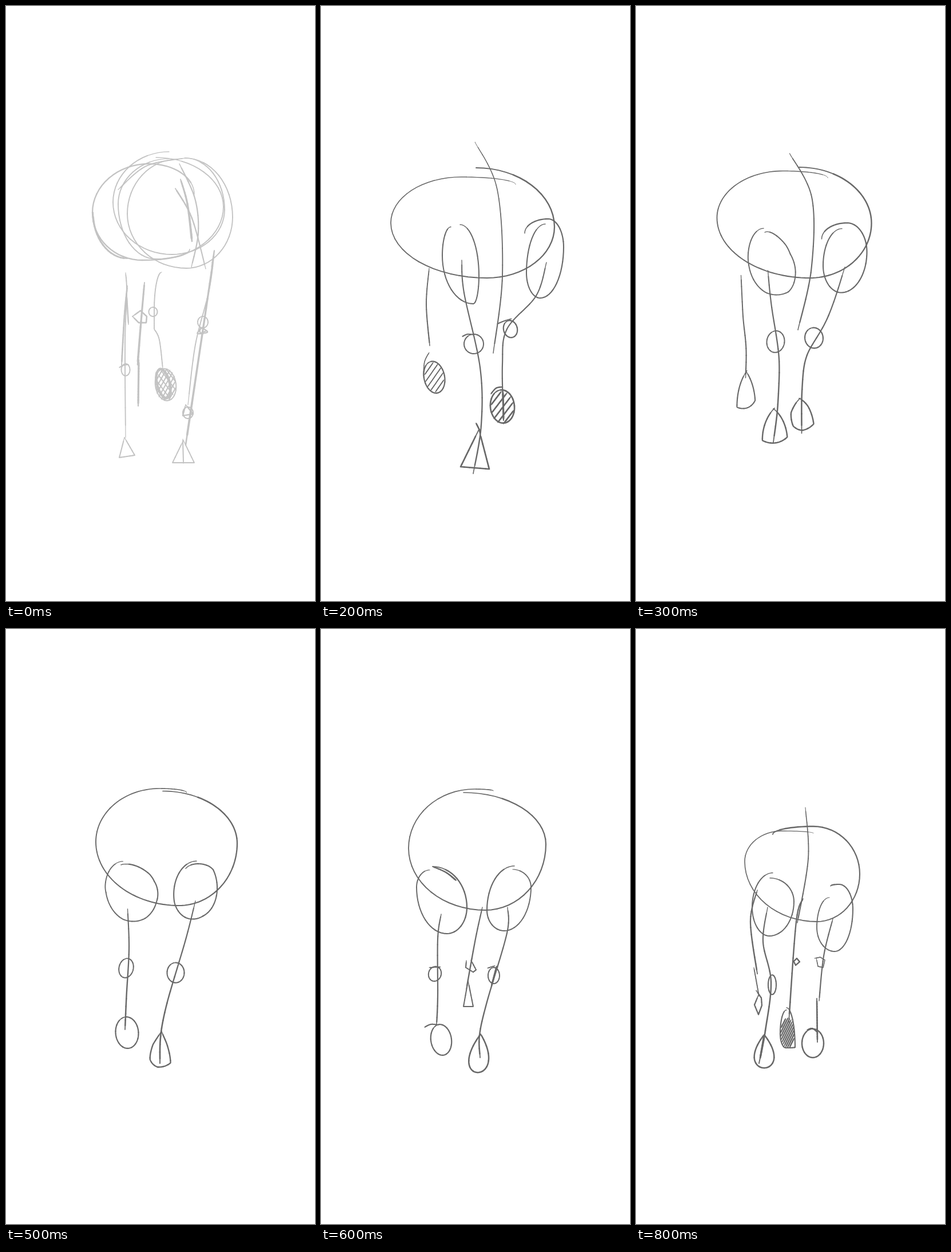
An HTML page with a canvas that plays this animation: 540 px wide and 1037 px high, repeating every 900 ms.

```html
<!DOCTYPE html>
<html lang="en">
<head>
<meta charset="utf-8">
<title>Walk cycle sketch</title>
<style>
html, body { margin: 0; width: 100%; height: 100%; overflow: hidden; background: #fff; }
canvas { display: block; width: 100vw; height: 100vh; }
</style>
</head>
<body>
<canvas id="stage" width="540" height="1037"></canvas>
<script>
const ctx = document.getElementById('stage').getContext('2d');
const STEP = 100;
const PRESSURE = 1.1;
const GREY = '#686868';
const mix = (a, b, t) => a + (b - a) * t;

// A stroke is { w0, w1, n, at(t) }: pen width at both ends, sample count and path.
const stroke = (w0, w1, n, at) => ({ w0, w1, n, at });

const pairs = xy => Array.from({ length: xy.length / 2 }, (_, i) => [xy[2 * i], xy[2 * i + 1]]);

// Walks a path made of equal parts; part(i, u) gives the point at u in part i.
function chain(w0, w1, count, part) {
  return stroke(w0, w1, count * 16, t => {
    const i = Math.min(count - 1, Math.floor(t * count));
    return part(i, t * count - i);
  });
}

function curve(w0, w1, ...xy) {
  const p = pairs(xy), last = p.length - 1;
  const spline = (a, b, c, d, t) =>
    b + t / 2 * (c - a + t * (2 * a - 5 * b + 4 * c - d + t * (3 * (b - c) + d - a)));
  return chain(w0, w1, last, (i, u) => [0, 1].map(k =>
    spline(p[Math.max(0, i - 1)][k], p[i][k], p[i + 1][k], p[Math.min(last, i + 2)][k], u)));
}

function lines(w, ...xy) {
  const p = pairs(xy);
  return chain(w, w, p.length - 1, (i, u) => [0, 1].map(k => mix(p[i][k], p[i + 1][k], u)));
}

// Egg outline: quarter ellipses between extreme points, whose tangents alternate
// between horizontal ('h') and vertical ('v').
function loop(w0, w1, first, ...xy) {
  const p = pairs(xy);
  return chain(w0, w1, p.length - 1, (i, u) => {
    const [a, b] = [p[i], p[i + 1]];
    const s = Math.sin(u * Math.PI / 2), c = 1 - Math.cos(u * Math.PI / 2);
    const flat = (i % 2 === 0) === (first === 'h');
    return [mix(a[0], b[0], flat ? s : c), mix(a[1], b[1], flat ? c : s)];
  });
}

function ring(w, cx, cy, rx, ry, tilt = 0, start = -2, sweep = 6.5) {
  const c = Math.cos(tilt), s = Math.sin(tilt);
  return stroke(w, w, 64, t => {
    const a = start + sweep * t, x = rx * Math.cos(a), y = ry * Math.sin(a);
    return [cx + x * c - y * s, cy + x * s + y * c];
  });
}

// Teardrop hanging from its tip; lean shifts the bottom sideways.
function drop(w, x, top, rx, height, lean = 0) {
  return stroke(w, w, 64, t => {
    const a = t * 2 * Math.PI, fall = (1 - Math.cos(a)) / 2;
    return [x + lean * fall + 1.25 * rx * Math.sin(a) * Math.sin(a / 2), top + height * fall];
  });
}

const triangle = (w, x, y, left, right, base, slope = 0) =>
  lines(w, x, y, right, base + slope, left, base, x, y);

// Parallel chords across an ellipse.
function hatch(w, cx, cy, rx, ry, count, angle) {
  const c = Math.cos(angle), s = Math.sin(angle);
  return Array.from({ length: count }, (_, i) => {
    const d = (i + 0.5) / count * 2 - 1, h = Math.sqrt(1 - d * d);
    const end = k => [cx + rx * (k * h * c - d * s), cy + ry * (k * h * s + d * c)];
    return lines(w, ...end(-1), ...end(1));
  });
}

function scribble(w, cx, cy, rx, ry, count) {
  const xy = [];
  for (let i = 0; i < count; i++) {
    const r = 0.8 + 0.25 * Math.sin(i * 5), a = i * 2.2;
    xy.push(cx + rx * r * Math.cos(a), cy + ry * r * Math.sin(a));
  }
  return curve(w, w, ...xy);
}

// In-between drawing made of the parts two poses share.
function between(a, b) {
  const pose = { ink: a.ink };
  const half = (p, q) => mix(p, q, 0.5);
  for (const name in a) {
    const p = a[name], q = b[name];
    if (name === 'ink' || name === 'marks' || !q) continue;
    pose[name] = stroke(half(p.w0, q.w0), half(p.w1, q.w1), 160, t => {
      const [u, v] = [p.at(t), q.at(t)];
      return [half(u[0], v[0]), half(u[1], v[1])];
    });
  }
  return pose;
}

const rough = {
  ink: '#c3c3c3',
  marks: [
    loop(2, 2.2, 'v', 329,328, 250,275, 151,360, 238,443, 321,424),
    loop(3, 2.4, 'v', 152,360, 212,440),
    loop(1.7, 1.7, 'h', 285,254, 187,342, 290,433, 382,355, 313,265),
    loop(1.7, 1.7, 'h', 313,265, 396,368, 315,457, 212,362, 300,267),
    loop(1.7, 1.7, 'h', 285,266, 196,345, 262,441, 380,350, 262,264),
    curve(1.7, 1.7, 196,320, 245,279, 313,265),
    curve(2, 2, 303,275, 330,335, 336,395, 324,455),
    curve(2.4, 3.6, 305,302, 317,345, 325,410),
    curve(2.4, 1.8, 296,318, 325,370, 349,458),
    curve(1.7, 1.7, 359,455, 364,427, 355,495, 331,590, 318,695),
    curve(2.6, 3.4, 361,450, 347,545, 314,765),
    ring(1.7, 344, 551, 9, 10),
    scribble(2, 343, 566, 10, 8, 6),
    ring(1.8, 318, 709, 9, 10),
    triangle(2, 314, 695, 309, 327, 714, -3),
    triangle(1.7, 310, 757, 291, 329, 796),
    lines(1.7, 309,755, 310,797),
    curve(1.7, 1.7, 209,465, 211,500, 208,590, 209,752),
    curve(2.4, 2.6, 212,488, 207,540, 202,626),
    lines(2, 211,505, 214,555),
    ring(1.7, 209, 634, 7.5, 10.5),
    curve(1.7, 1.7, 198,630, 206,626, 214,625),
    triangle(1.8, 207, 752, 198, 225, 787, -4),
    curve(2.6, 3.4, 242,482, 236,550, 230,625),
    lines(3, 232,617, 231,697),
    lines(2.2, 221,541, 235,531, 246,541, 245,552, 232,552, 221,541),
    loop(1.7, 1.7, 'h', 272,464, 259,530, 259,563),
    curve(1.7, 1.7, 259,563, 268,582, 274,632),
    ring(1.7, 257, 533, 7.5, 8),
    ring(1.8, 279, 660, 18, 28, -0.15),
    ring(4, 275, 658, 11, 26, -0.25),
    ...hatch(1.8, 279, 660, 18, 28, 7, -0.85),
    ...hatch(1.6, 279, 660, 17, 27, 5, 0.7)
  ]
};

const bold = {
  ink: '#505050',
  marks: [
    loop(2.4, 1.8, 'h', 285,238, 386,325, 268,436, 160,335, 285,239),
    curve(2, 1.8, 195,265, 216,255, 240,246),
    curve(1.4, 1.4, 270,240, 292,239, 314,244),
    loop(1.4, 1.8, 'h', 252,243, 330,368),
    curve(1.2, 1.2, 289,251, 303,248, 318,259),
    loop(1.8, 2, 'v', 181,430, 236,357, 292,418, 270,446, 237,437),
    lines(1.6, 237,437, 266,433),
    loop(1.2, 1.2, 'v', 211,374, 231,415),
    ring(1.7, 354, 413, 36, 38.5),
    curve(1.8, 1.4, 316,393, 333,374, 353,364),
    curve(2.4, 2.8, 168,449, 161,530, 164,620, 174,709),
    ring(2, 163, 568, 11, 11),
    triangle(2.6, 167, 640, 160, 187, 698, -4),
    triangle(2.2, 170, 650, 165, 184, 697),
    lines(2.4, 172,655, 174,703),
    curve(1.6, 1.8, 260,409, 253,500, 220,635, 214,700, 222,758),
    curve(2.6, 2.2, 299,422, 260,530, 241,585, 239,645),
    scribble(2.2, 244, 541, 11, 14, 8),
    scribble(2.2, 264, 534, 8, 11, 7),
    loop(2.4, 2.6, 'h', 213,659, 182,725, 208,754),
    lines(2.4, 207,754, 234,752, 213,659),
    scribble(2.2, 239, 661, 6, 17, 9),
    triangle(2.2, 241, 672, 225, 258, 709, 2),
    lines(1.4, 240,690, 242,715),
    curve(2.4, 2.8, 343,463, 336,540, 322,712),
    lines(3, 343,466, 338,520),
    scribble(2.4, 336, 543, 17, 14, 18),
    lines(2.4, 318,545, 325,571),
    loop(2.4, 2.4, 'h', 340,692, 292,716, 325,745, 341,720, 340,692),
    ring(2.8, 325, 722, 17, 22),
    ...hatch(2.2, 312, 715, 20, 24, 4, -0.85)
  ]
};

const wide = {
  ink: GREY,
  body: loop(1, 2.4, 'v', 340,311, 245,298, 122,378, 290,474, 408,385, 271,282),
  spine: curve(1.2, 2, 269,237, 308,320, 317,470, 301,605),
  thighL: loop(1.8, 1.8, 'h', 227,385, 212,435, 266,519, 276,470, 243,381),
  thighR: loop(2, 1.8, 'v', 356,396, 397,371, 424,420, 383,509, 359,465, 392,380),
  legBack: curve(1.6, 2, 189,457, 184,520, 190,592),
  footBack: ring(2, 198, 647, 18, 28, -0.2),
  legL: curve(1.8, 2.2, 246,443, 250,500, 278,630, 280,730, 266,815),
  kneeL: ring(1.8, 267, 589, 17, 17),
  footL: triangle(2.4, 276, 738, 244, 294, 803, 4),
  legR: curve(1.8, 2, 394,447, 376,505, 325,563, 317,625, 319,722),
  kneeR: ring(2, 331, 563, 12, 15, -0.25),
  footR: ring(2.4, 317, 698, 21, 29, -0.1),
  marks: [
    curve(1.4, 1.4, 189,604, 181,620, 179,645),
    curve(1.8, 1.4, 247,576, 256,572, 267,573),
    curve(1.8, 1.4, 308,554, 320,549, 333,545),
    curve(2, 2, 297,676, 306,666, 317,664),
    lines(2.2, 271,727, 279,743),
    lines(2.8, 318,672, 319,722),
    ...hatch(1.6, 198, 647, 17, 26, 5, -0.75),
    ...hatch(2.3, 317, 700, 20, 28, 5, -0.75)
  ]
};

const crouch = {
  ink: GREY,
  body: loop(1.3, 2.5, 'v', 330,288, 268,277, 161,360, 318,474, 415,372, 299,280),
  spine: curve(2, 2.2, 268,277, 307,350, 296,445, 265,524),
  thighL: loop(1.6, 1.8, 'h', 219,390, 179,450, 222,497, 285,430, 250,392, 207,408),
  thighR: loop(2.2, 1.8, 'v', 293,416, 341,385, 383,437, 334,490, 295,440, 328,396),
  legBack: curve(1.8, 2, 178,482, 188,570, 199,640, 193,704),
  footBack: triangle(1.8, 199, 650, 163, 200, 729, -2),
  legL: curve(1.8, 2.6, 215,479, 226,575, 217,640, 214,706),
  kneeL: ring(1.8, 221, 581, 14, 21, 0.2),
  footL: ring(2, 213, 691, 22, 28),
  legR: curve(1.8, 2.8, 336,463, 285,610, 266,690, 260,767),
  kneeR: ring(2, 291, 594, 20, 21),
  footR: lines(2, 264,695, 274,722, 283,756, 257,754, 245,744, 246,725, 264,697),
  marks: [
    curve(1.4, 1.4, 204,572, 217,568, 230,570),
    curve(2, 1.4, 190,688, 198,678, 211,675),
    lines(2.4, 227,570, 226,597),
    lines(2.6, 214,660, 214,704)
  ]
};

const tall = {
  ink: GREY,
  body: loop(1.4, 2.1, 'v', 301,282, 268,279, 153,382, 287,490, 393,375, 249,285),
  thighL: loop(1.6, 2.2, 'h', 190,420, 167,450, 220,531, 255,485, 195,414),
  thighR: loop(1.6, 2, 'h', 335,419, 367,450, 320,526, 290,490, 338,413),
  legL: curve(1.8, 2.2, 210,497, 204,540, 204,640, 202,690),
  kneeL: ring(1.8, 199, 601, 11, 13, 0.3),
  footL: ring(2, 210, 716, 18, 27, -0.15),
  legMid: curve(1.8, 2.2, 282,485, 270,540, 254,628),
  kneeMid: lines(1.8, 254,578, 253,590, 266,598, 271,594, 262,577),
  footMid: triangle(1.8, 257, 613, 249, 266, 658),
  legR: curve(1.8, 2.4, 326,485, 325,530, 290,650, 277,708, 278,747),
  kneeR: ring(1.8, 302, 604, 10, 14),
  footR: drop(2.3, 279, 706, 18, 67, -5),
  marks: [
    curve(1.8, 1.8, 181,694, 192,689, 205,690),
    lines(1.4, 189,590, 209,589),
    lines(1.4, 291,591, 304,587),
    curve(1.8, 2.6, 195,414, 218,424, 236,438),
    lines(2.6, 307,588, 298,622)
  ]
};

const low = {
  ink: GREY,
  body: loop(1, 2.4, 'v', 310,356, 255,352, 190,405, 316,510, 391,427, 310,344, 239,358),
  spine: curve(1.4, 2, 296,311, 301,400, 282,512),
  thighL: loop(1.8, 1.8, 'h', 239,425, 203,485, 233,535, 276,475, 234,434),
  thighR: loop(2, 1.6, 'v', 340,448, 355,445, 379,488, 347,562, 316,520, 338,468),
  legBack: curve(1.8, 2.4, 212,455, 200,510, 212,601),
  footBack: lines(2, 210,630, 219,643, 220,656, 214,672, 207,655, 214,638),
  legL: curve(1.8, 2.6, 230,485, 222,545, 236,615, 226,700, 215,757),
  kneeL: ring(1.9, 238, 620, 7, 17),
  footL: drop(2.3, 224, 707, 18, 58),
  legMid: curve(1.8, 2.4, 292,470, 280,510, 267,685),
  kneeMid: lines(2, 275,580, 281,574, 286,580, 279,586, 275,578),
  footMid: loop(1.9, 1.9, 'h', 263,660, 278,729, 262,730, 252,705, 263,664),
  legR: curve(1.8, 2, 344,505, 328,570, 320,648),
  kneeR: lines(1.4, 312,574, 322,572, 330,577, 327,590, 318,588, 315,573),
  footR: ring(2.2, 309, 722, 19, 25),
  marks: [
    lines(1.6, 206,590, 215,640),
    curve(1.8, 1.8, 299,699, 308,696, 318,704),
    lines(2.4, 316,644, 317,720),
    lines(2.8, 224,708, 217,748),
    ...hatch(2, 265, 704, 12, 26, 10, -0.75)
  ]
};

const poses = [
  rough, bold, wide, between(wide, crouch), crouch,
  between(crouch, tall), tall, between(tall, low), low
];

// Pen width changes along the stroke and thins out at both tips.
function drawStroke({ w0, w1, n, at }) {
  const chunk = Math.ceil(n / 16);
  for (let i = 0; i < n; i += chunk) {
    const end = Math.min(n, i + chunk), t = (i + end) / 2 / n;
    ctx.lineWidth = PRESSURE * mix(w0, w1, t) * Math.min(1, 0.5 + 6 * Math.min(t, 1 - t));
    ctx.beginPath();
    for (let k = i; k <= end; k++) ctx.lineTo(...at(k / n));
    ctx.stroke();
  }
}

function draw() {
  const pose = poses[Math.floor(performance.now() / STEP) % poses.length];
  ctx.fillStyle = '#fff';
  ctx.fillRect(0, 0, 540, 1037);
  ctx.strokeStyle = pose.ink;
  ctx.lineCap = ctx.lineJoin = 'round';
  for (const [name, part] of Object.entries(pose)) {
    if (name !== 'ink') [].concat(part).forEach(drawStroke);
  }
  requestAnimationFrame(draw);
}
draw();
</script>
</body>
</html>
```
